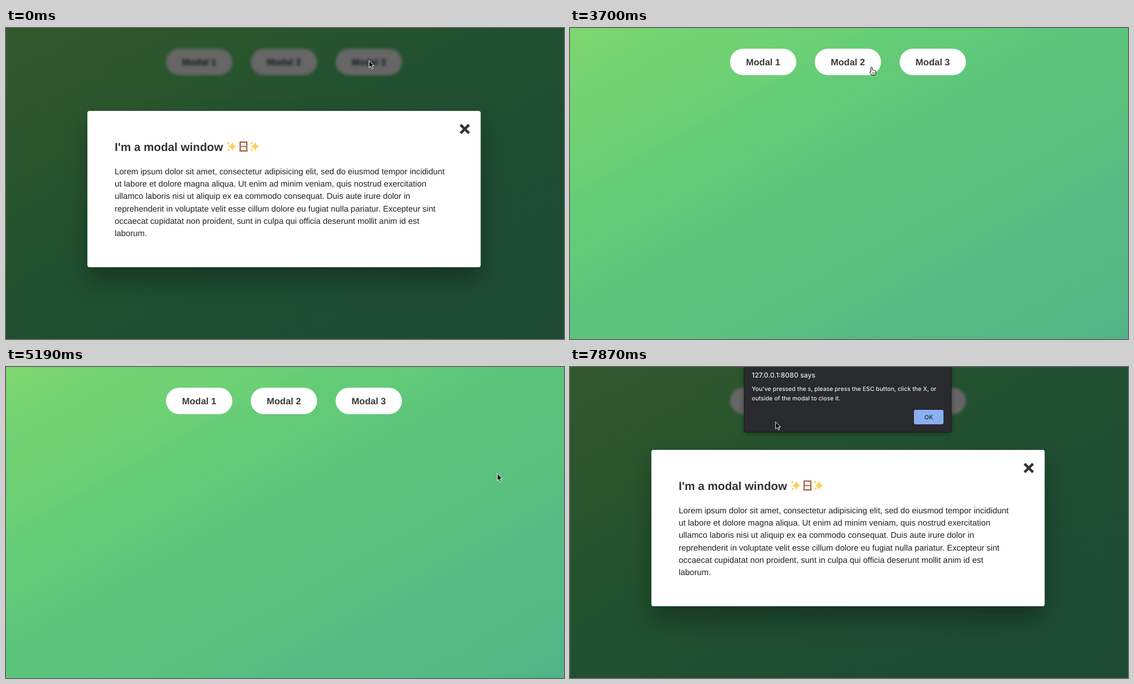
Write an HTML page that moves like this. It is 1001 px wide and 559 px high and loops after 8000 ms.

```html
<!DOCTYPE html>
<html lang="en">
<head>
<meta charset="utf-8">
<title>Modal window</title>
<style>
  html, body { margin: 0; width: 100%; height: 100%; overflow: hidden; background: #5cc47d; }
  svg { display: block; width: 100vw; height: 100vh; }
  text { font-family: "Liberation Sans", Arial, sans-serif; fill: #333; text-rendering: geometricPrecision; }
  .buttons rect { fill: #fff; }
  .buttons text { font-size: 16.53px; font-weight: 700; text-anchor: middle; fill: #3a3a3a; }
  .open .buttons { filter: brightness(.4) blur(2.5px); }
  .overlay, .alert, .hand { visibility: hidden; }
  .open .overlay, .alerting .alert, .pointing .hand { visibility: visible; }
  .pointing .arrow { visibility: hidden; }
  .card { fill: #fff; filter: drop-shadow(0 24.8px 20.6px rgba(0, 0, 0, .3)); }
  .title { font-size: 20.67px; font-weight: 700; }
  .copy text { font-size: 14.88px; fill: #222; }
  .close { stroke: #333; stroke-width: 4.6; }
  .alert text { font-family: Inter, Roboto, sans-serif; font-size: 10.65px; font-weight: 500; fill: #e8eaed; }
  .alert .host { font-size: 12.4px; }
  .alert .ok { fill: #202124; font-size: 10.5px; text-anchor: middle; }
  .panel { fill: #292a2d; stroke: #17191a; filter: drop-shadow(0 2px 4px rgba(0, 0, 0, .4)); }
</style>
</head>
<body>
<svg id="stage" viewBox="0 0 1001 559" preserveAspectRatio="none" class="open">
  <defs>
    <linearGradient id="light" x2="1" y2="1">
      <stop stop-color="#7fd770"/>
      <stop offset=".1" stop-color="#74d372"/>
      <stop offset=".26" stop-color="#6bcf75"/>
      <stop offset=".28" stop-color="#65cd76"/>
      <stop offset=".37" stop-color="#62ca78"/>
      <stop offset=".45" stop-color="#5cc57c"/>
      <stop offset=".62" stop-color="#5bc37e"/>
      <stop offset=".73" stop-color="#57bc83"/>
      <stop offset=".9" stop-color="#55b986"/>
      <stop offset="1" stop-color="#50b388"/>
    </linearGradient>
    <linearGradient id="dark" x2="1" y2="1">
      <stop stop-color="#32572d"/>
      <stop offset=".24" stop-color="#2a552d"/>
      <stop offset=".4" stop-color="#225130"/>
      <stop offset=".6" stop-color="#1f4e32"/>
      <stop offset="1" stop-color="#1e4a34"/>
    </linearGradient>
    <g id="sparkles" fill="#fbd15b">
      <path d="M11 1Q12 8 19 10Q12 12 11 19Q10 12 3 10Q10 8 11 1Z"/>
      <path d="M4 1Q4.4 3.600 7 4Q4.400 4.400 4 7Q3.600 4.400 1 4Q3.600 3.600 4 1Z"/>
      <path d="M4.500 13Q5 15.500 7.500 16Q5 16.500 4.500 19Q4 16.500 1.500 16Q4 15.500 4.500 13Z"/>
    </g>
  </defs>

  <rect width="1001" height="559" fill="url(#light)"/>
  <rect class="overlay" width="1001" height="559" fill="url(#dark)"/>

  <g class="buttons" id="buttons"></g>

  <g class="overlay">
    <rect class="card" x="146" y="149" width="705.5" height="281" rx="4"/>
    <path class="close" d="M815.400 174L830.600 189.200M830.600 174L815.400 189.200"/>
    <text class="title" x="195" y="220.6">I'm a modal window</text>
    <use href="#sparkles" x="395" y="203"/>
    <g fill="#f3efed" stroke="#9b5a40" stroke-width="2">
      <rect x="420" y="205" width="12" height="16"/>
      <path d="M420 213H432M418.500 221H433.500" stroke-width="1.600"/>
    </g>
    <use href="#sparkles" x="436" y="203"/>
    <g class="copy" id="copy"></g>
  </g>

  <g class="alert">
    <path class="panel" d="M312.500 -1V113Q312.500 117 316.500 117H680Q684 117 684 113V-1Z"/>
    <text class="host" x="326" y="19">127.0.0.1:8080 says</text>
    <text x="326" y="43">You've pressed the s, please press the ESC button, click the X, or</text>
    <text x="326" y="59.500">outside of the modal to close it.</text>
    <rect x="617" y="77" width="53" height="26" rx="3" fill="#8aaff2"/>
    <text class="ok" x="643.500" y="93.700">OK</text>
  </g>

  <g id="cursor">
    <path class="arrow" d="M0 0V12.800L2.900 10.200L4.900 14.900L7 14L5 9.400H9Z" fill="#000" stroke="#fff"/>
    <g class="hand" stroke="#000" stroke-linejoin="round">
      <path d="M-1.300 1.200Q-1.300 0 0 0T1.300 1.200V5.200Q2.400 4.400 3.400 5.600Q4.800 5 5.600 6.200Q7.600 5.800 7.600 7.600V10Q7.600 12 6.400 14H0Q-1 11.800 -3.400 9Q-3 6.800 -1.300 8.600Z" fill="#fff"/>
      <path d="M1.700 9V12M3.500 9V12M5.300 9V12" stroke-width=".7"/>
    </g>
  </g>
</svg>

<script>
  const LOOP = 8000;
  const stage = document.getElementById('stage');
  const cursor = document.getElementById('cursor');

  const buttonLeft = [287, 439, 591.3];
  const button = { top: 37.3, width: 119, height: 47.4 };
  document.getElementById('buttons').innerHTML = buttonLeft.map((x, i) =>
    `<rect x="${x}" y="${button.top}" width="${button.width}" height="${button.height}" rx="23.7"/>
     <text x="${x + button.width / 2}" y="67">Modal ${i + 1}</text>`).join('');

  document.getElementById('copy').innerHTML = [
    'Lorem ipsum dolor sit amet, consectetur adipisicing elit, sed do eiusmod tempor incididunt',
    'ut labore et dolore magna aliqua. Ut enim ad minim veniam, quis nostrud exercitation',
    'ullamco laboris nisi ut aliquip ex ea commodo consequat. Duis aute irure dolor in',
    'reprehenderit in voluptate velit esse cillum dolore eu fugiat nulla pariatur. Excepteur sint',
    'occaecat cupidatat non proident, sunt in culpa qui officia deserunt mollit anim id est',
    'laborum.'
  ].map((line, i) => `<text x="195" y="${262.8 + 22.3 * i}">${line}</text>`).join('');

  const home = [651.3, 58.5];
  const moves = [
    { start: 140, end: 1030, steps: 7, to: [783.5, 204.5] },
    { start: 1330, end: 1770, steps: 4, to: [820.5, 176.5] },
    { start: 2820, end: 3700, steps: 7, to: [541, 70.5] },
    { start: 4150, end: 4890, steps: 6, to: [881.3, 191.5] },
    { start: 5490, end: 5930, steps: 4, to: [375, 62.5] },
    { start: 6370, end: 6670, steps: 3, to: [368.8, 98.5] }
  ];
  const ease = k => k * k * (3 - 2 * k);

  // The pointer advances in discrete samples, the first one landing at `start`.
  function pointerAt(t) {
    let from = home;
    for (const { start, end, steps, to } of moves) {
      if (t < start) break;
      const sample = Math.floor((t - start + 5) / (end - start) * (steps - 1)) + 1;
      const k = ease(Math.min(1, sample / steps));
      from = from.map((v, axis) => v + (to[axis] - v) * k);
    }
    return from;
  }

  const isOpen = t => t < 2370 || (t >= 3850 && t < 5190) || t >= 6080;
  const overClose = (x, y) => x > 810 && x < 836 && y > 164 && y < 198;
  const overButton = (x, y) => y > button.top && y < button.top + button.height &&
    buttonLeft.some(left => x > left && x < left + button.width);

  function draw(now) {
    const t = now % LOOP;
    const [x, y] = pointerAt(t);
    const open = isOpen(t);
    stage.classList.toggle('open', open);
    stage.classList.toggle('alerting', t >= 7870);
    stage.classList.toggle('pointing', open ? overClose(x, y) : overButton(x, y));
    cursor.setAttribute('transform', `translate(${x} ${y})`);
  }

  const begin = performance.now();
  function tick() {
    draw(performance.now() - begin);
    requestAnimationFrame(tick);
  }
  tick();
</script>
</body>
</html>
```
